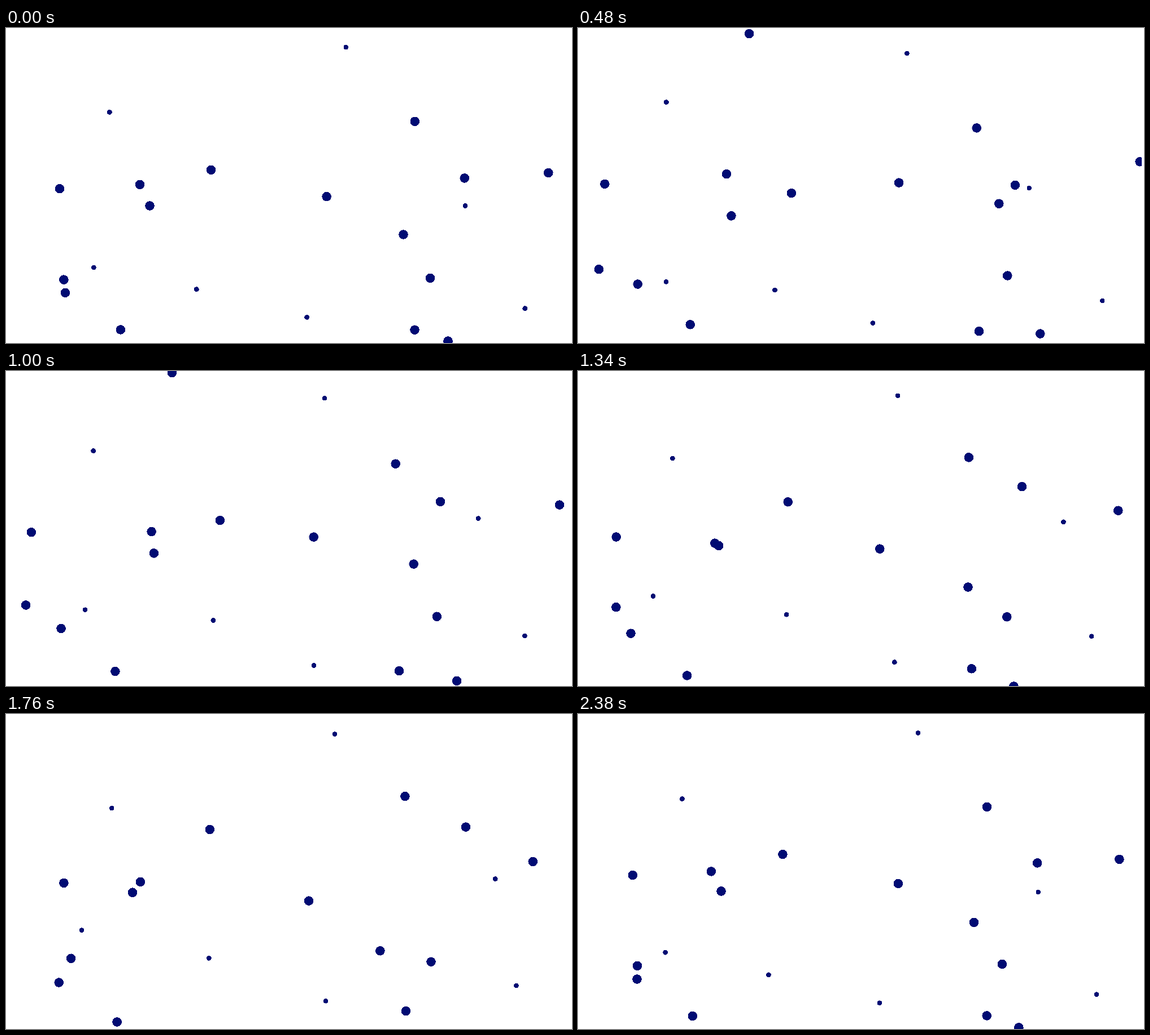
Animation of 1002 by 559 pixels, one loop 2.4 s. Source, as an HTML page:

```html
<!DOCTYPE html>
<html lang="en">
<head>
<meta charset="utf-8">
<title>Drifting dots</title>
<style>
  html, body { margin: 0; width: 100%; height: 100%; overflow: hidden; background: #fff; }
  svg { display: block; fill: #000b73; shape-rendering: crispEdges; }
</style>
</head>
<body>
<svg id="stage" width="998" height="559"></svg>
<script>
const LOOP = 2400, STEP = 20;
const WARP = 0.075; // makes every orbit run faster near the loop's start
const stage = document.getElementById('stage');
const dots = [];

// A dot circles a centre on an ellipse spanned by a main and a side swing.
function dot(r, x, y, mainX, mainY, sideX = 0, sideY = 0) {
  const el = document.createElementNS('http://www.w3.org/2000/svg', 'circle');
  el.setAttribute('r', r);
  stage.append(el);
  dots.push((main, side) => {
    el.setAttribute('cx', x + mainX * main + sideX * side + 0.5);
    el.setAttribute('cy', y + mainY * main + sideY * side + 0.5);
  });
}
const large = (...orbit) => dot(8.3, ...orbit);
const small = (...orbit) => dot(4.4, ...orbit);

large(705, 161, -4, 15, 17, 4);
large(369, 248, 10, 44, -6, 3);
large(74, 288, -32, -11, 19, -3);
large(243, 288, 21, -27, -6, -10);
large(254, 315, 17, 18);
large(75, 430, -45, -6, 25, 15);
large(99, 465, 5, -12, 5, 4);
large(197, 536, 0, -10, 5, -1);
large(551, 303, 13, -28, 15, -4);
large(703, 366, 42, -55);
large(756, 439, 5, -1, -5, 4);
large(708, 532, -2, 5, 14, 3);
large(782, 555, 36, -13);
large(963, 249, 32, -14, -3, 7);
large(793, 238, -24, 34, 17, 26);
large(291, -11, 11, 22, 3, -5);

small(581, 40, -4, 6, 19, -6);
small(171, 149, -18, -18, 11, 0);
small(833, 287, -30, -10, -19, 26);
small(354, 448, -2, 13, -16, 14);
small(144, 416, 9, 32, 10, 8);
small(544, 516, -20, 8, -11, -3);
small(915, 482, 12, -2, 3, 14);

const start = performance.now();
function tick() {
  const t = Math.floor((performance.now() - start) % LOOP / STEP) * STEP;
  const angle = 2 * Math.PI * t / LOOP;
  const main = Math.sin(angle) + WARP * Math.sin(2 * angle);
  const side = Math.cos(angle) + WARP * Math.cos(2 * angle);
  for (const move of dots) move(main, side);
  requestAnimationFrame(tick);
}
tick();
</script>
</body>
</html>
```
